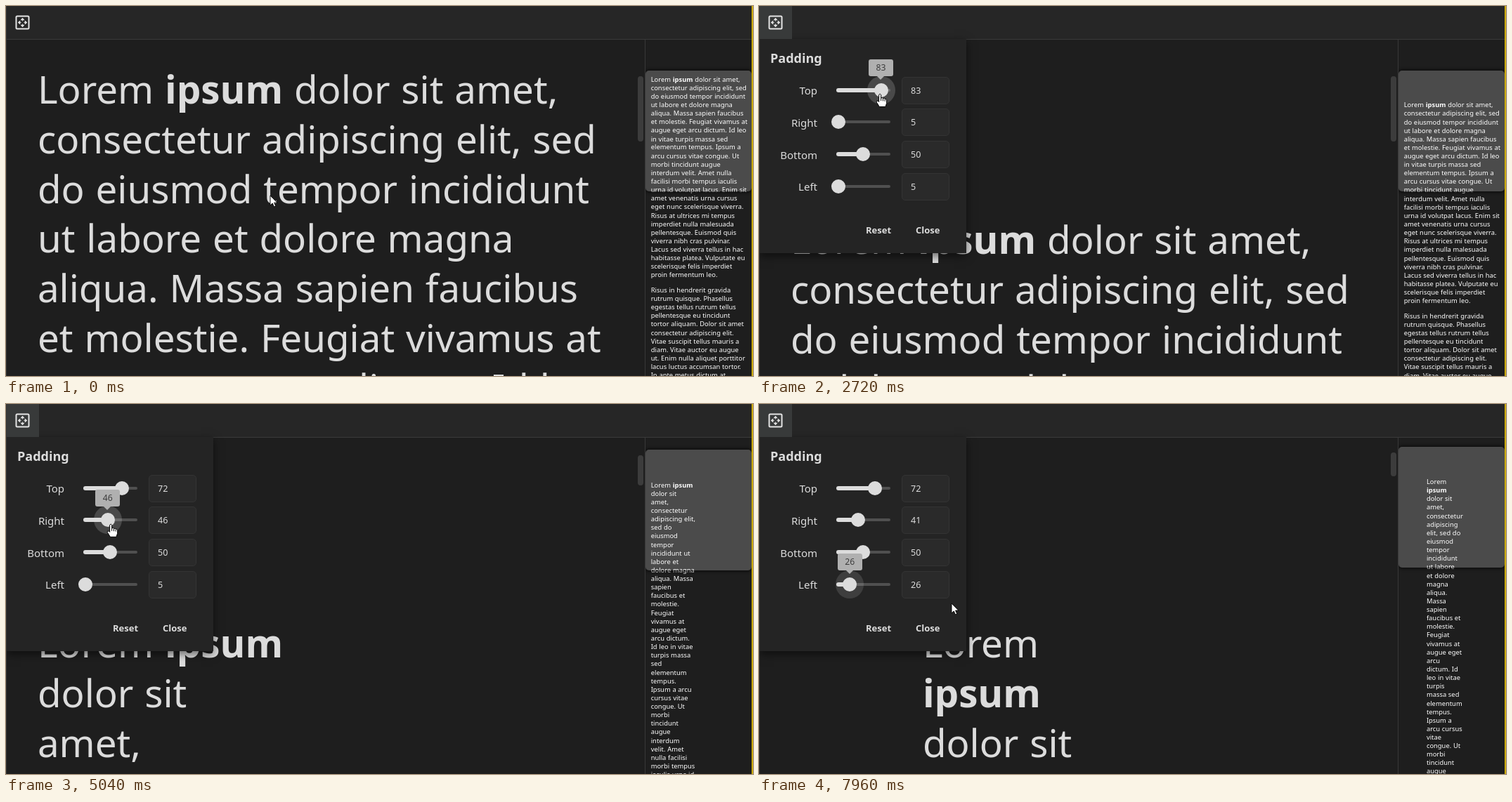
Write an HTML page that moves like this. It is 1063x527 px and loops after 8 s.

```html
<!DOCTYPE html>
<html lang="en">
<head>
<meta charset="utf-8">
<title>Padding editor</title>
<style>
html, body { margin: 0; width: 100%; height: 100%; overflow: hidden; background: #1e1e1e; }
.stage { position: relative; width: 1063px; height: 527px; overflow: hidden; font-family: "Noto Sans", "Open Sans", sans-serif; color: #dcdcdc; }
.stage div, .stage svg, .stage span { position: absolute; box-sizing: border-box; }
.topbar { inset: 0 0 auto 0; height: 48px; background: #262626; border-bottom: 1px solid #3a3a3a; }
.edge { left: 0; top: 0; width: 1px; height: 527px; background: #343434; }
.accent { right: 0; top: 0; width: 2px; height: 527px; background: #c9a80c; }

.main { left: 0; top: 48px; width: 909px; height: 479px; overflow: hidden; }
.map { left: 909px; top: 48px; width: 152px; height: 479px; overflow: hidden; border-left: 1px solid #383838; }
.mini { left: -.5px; transform-origin: 0 0; color: #fff; }
.text { font-size: 54.7px; line-height: 70.8px; word-spacing: .03em; }
.text p { margin: 0 0 55px; }
.lens { left: 0; width: 151px; height: 172px; border-radius: 5px; background: rgba(255,255,255,.2); box-shadow: 0 0 5px 1px rgba(0,0,0,.75); }
.scroll { left: 899px; width: 8px; border-radius: 4px; background: #3c3c3c; }

.button { left: 0; top: 0; width: 47px; height: 47px; background: #383a3a; }
.panel { left: 1px; top: 47px; width: 294px; height: 305px; background: #242424; box-shadow: 0 4px 12px rgba(0,0,0,.55); }
.title { left: 15px; top: 14px; font-size: 18px; line-height: 26px; font-weight: 600; }
.action { top: 262px; font-size: 13px; line-height: 20px; font-weight: 600; }
.row { left: 0; width: 294px; height: 0; }
.label { right: 212px; top: -10px; font-size: 15px; line-height: 20px; }
.track { left: 109px; top: -2.5px; width: 77px; height: 4px; border-radius: 2px; background: #505050; }
.fill { left: 109px; top: -3.5px; height: 6px; border-radius: 3px; background: #dcdcdc; }
.thumb { top: -10.5px; width: 20px; height: 20px; margin-left: -10px; border-radius: 50%; background: #dcdcdc; }
.halo { top: -20.5px; width: 40px; height: 40px; margin-left: -20px; border-radius: 50%; background: #dcdcdc; }
.input { left: 202px; top: -19.5px; width: 68px; height: 39px; padding-left: 12px; border: 1px solid #343434; border-radius: 5px; background: #2a2a2a; font-size: 12.6px; line-height: 37px; }
.bubble { top: -44px; width: 35px; height: 24px; margin-left: -17.5px; border-radius: 3px; background: #b0b0b0; color: #3c3c3c; font-size: 12.2px; line-height: 24px; text-align: center; }
.bubble::after { content: ""; position: absolute; left: 12px; top: 24px; border: 5.5px solid transparent; border-top-color: #b0b0b0; border-bottom: 0; }
.cursor { left: 0; top: 0; overflow: visible; }
</style>
</head>
<body>
<div class="stage">
  <div class="main"><div class="text"></div></div>
  <div class="map"><div class="mini"><div class="text"></div></div><div class="lens"></div></div>
  <div class="scroll"></div>
  <div class="topbar"></div>
  <div class="panel">
    <div class="title">Padding</div>
    <div class="action" style="left:151px">Reset</div>
    <div class="action" style="left:222px">Close</div>
  </div>
  <div class="button"></div>
  <svg width="47" height="47" fill="none" stroke="#e4e4e4">
    <rect x="14.5" y="14.5" width="18" height="18" rx="1.5" stroke-width="2"/>
    <g id="arrows"></g>
  </svg>
  <div class="edge"></div>
  <div class="accent"></div>
  <svg class="cursor" width="20" height="24" stroke="#000" fill="#fff" stroke-linejoin="round">
    <path id="arrow" transform="scale(.9)" d="M0 0V15.5L3.6 12.2L6 17.6L8.6 16.5L6.2 11.2H11Z"/>
    <path id="hand" d="M-1.5 1.5Q0 -1 1.5 1.5V6Q3.2 5 4.3 6.6Q6 5.8 7 7.4Q9.2 6.8 9.5 9V13.5L7.8 18.5H-.8L-5 11.8Q-5 9.2 -2.6 10.4L-1.5 11.6ZM1.5 6V10M4.3 7V10.4M7 8V10.8"/>
  </svg>
</div>
<script>
const $ = (selector, root = document) => root.querySelector(selector);
const paragraphs = [
  `Lorem <b>ipsum</b> dolor sit amet, consectetur adipiscing elit, sed do eiusmod tempor incididunt ut labore et dolore magna aliqua. Massa sapien faucibus et molestie. Feugiat vivamus at augue eget arcu dictum. Id leo in vitae turpis massa sed elementum tempus. Ipsum a arcu cursus vitae congue. Ut morbi tincidunt augue interdum velit. Amet nulla facilisi morbi tempus iaculis urna id volutpat lacus. Enim sit amet venenatis urna cursus eget nunc scelerisque viverra. Risus at ultrices mi tempus imperdiet nulla malesuada pellentesque. Euismod quis viverra nibh cras pulvinar. Lacus sed viverra tellus in hac habitasse platea. Vulputate eu scelerisque felis imperdiet proin fermentum leo.`,
  `Risus in hendrerit gravida rutrum quisque. Phasellus egestas tellus rutrum tellus pellentesque eu tincidunt tortor aliquam. Dolor sit amet consectetur adipiscing elit. Vitae suscipit tellus mauris a diam. Vitae auctor eu augue ut. Enim nulla aliquet porttitor lacus luctus accumsan tortor. In ante metus dictum at tempor commodo.`
];
const texts = [...document.querySelectorAll('.text')];
for (const text of texts) text.innerHTML = paragraphs.map(p => `<p>${p}</p>`).join('');

$('#arrows').innerHTML = [0, 90, 180, 270].map(angle =>
  `<path transform="rotate(${angle} 23.5 23.5)" d="M23.5 17.2l2.3 2.6h-4.6zM23.5 19.5v2" fill="#e4e4e4"/>`).join('');

const LOOP = 8000, STEP = 40;
const LAG = 180;            // the text follows the sliders this much later
const VIEW_TOP = 48, MAP_SCALE = .1713;

const mix = (a, b, k) => a + (b - a) * k;
const progress = (t, start, end) => Math.min(1, Math.max(0, (t - start) / (end - start)));
const pulse = (t, [start, end]) => progress(t, start, start + 120) * (1 - progress(t, end, end + 120));
const linear = k => k;
const easeOut = k => 1 - (1 - k) ** 3;
const easeInOut = k => k * k * (3 - 2 * k);

// strokes: start, end, value reached, easing
const sliders = {
  top: { label: 'Top', rest: 50, grip: -1, hover: [2040, 3880], drag: [2200, 3880],
    strokes: [[2200, 2920, 95, linear], [3120, 3320, 73, easeOut], [3480, 3600, 72, linear]] },
  right: { label: 'Right', rest: 5, grip: 4, hover: [4160, 5440], drag: [4200, 5440],
    strokes: [[4240, 4800, 53.8, linear], [4960, 5280, 41, easeOut]] },
  bottom: { label: 'Bottom', rest: 50, strokes: [] },
  left: { label: 'Left', rest: 5, grip: 7, hover: [5560, 7520], drag: [5560, LOOP],
    strokes: [[5745, 6160, 36, linear], [6520, 7140, 26, easeInOut]] }
};

const valueAt = (slider, t) => slider.strokes.reduce(
  (value, [start, end, to, ease]) => mix(value, to, ease(progress(t, start, end))), slider.rest);
const thumbX = value => 108.2 + .775 * value;

Object.values(sliders).forEach((slider, i) => {
  const row = document.createElement('div');
  row.className = 'row';
  slider.y = 73 + i * 45.8;
  row.style.top = slider.y + 'px';
  row.innerHTML = `<span class="label">${slider.label}</span><div class="track"></div>` +
    '<div class="fill"></div><div class="halo"></div><div class="thumb"></div>' +
    '<div class="input"></div><div class="bubble"></div>';
  $('.panel').append(row);
  slider.part = name => $('.' + name, row);
});

function drawSlider({ part, hover, drag, ...slider }, t) {
  const value = Math.round(valueAt(slider, t));
  const x = thumbX(value);
  const over = hover ? pulse(t, hover) : 0, held = drag ? pulse(t, drag) : 0;
  part('fill').style.width = x - 109 + 'px';
  for (const name of ['halo', 'thumb', 'bubble']) part(name).style.left = x + 'px';
  part('halo').style.transform = `scale(${.7 + .3 * held})`;
  part('halo').style.opacity = .06 * over + .14 * held;
  part('bubble').style.opacity = held;
  part('input').textContent = part('bubble').textContent = value;
}

function drawText(t) {
  const [top, right, left] = ['top', 'right', 'left'].map(side => valueAt(sliders[side], t - LAG));
  const width = 6 + 8.886 * (100 - left - right);
  const lens = .062 * width - 6;
  for (const text of texts) {
    text.style.left = 8.95 * left + .2 + 'px';
    text.style.top = 35 + 10.09 * (top - 50) + 'px';
    text.style.width = width + 'px';
  }
  $('.mini').style.transform = `translateY(${lens}px) scale(${MAP_SCALE})`;
  $('.lens').style.top = lens + 'px';
  $('.scroll').style.top = lens + VIEW_TOP + 8 + 'px';
  $('.scroll').style.height = .115 * width + 'px';
}

const point = (x, y) => () => [x, y];
const holding = slider => t => [thumbX(valueAt(slider, t)) + 1 + slider.grip, slider.y + 52];
const moves = [
  [0, 80, point(269, 241)], [280, 920, point(10, 30)], [1320, 1400, point(24, 34)],
  [1640, 2120, holding(sliders.top)], [3800, 4160, holding(sliders.right)],
  [5440, 5720, holding(sliders.left)], [7520, 7960, point(274, 284)]
];

function drawCursor(t) {
  let pos = [376, 270];
  for (const [start, end, target] of moves) {
    const k = easeInOut(progress(t, start, end)), goal = target(t);
    pos = pos.map((p, i) => mix(p, goal[i], k));
  }
  const isHand = (t >= 1320 && t < 1680) || (t >= 2040 && t < 7360);
  $('.cursor').style.transform = `translate(${pos[0]}px, ${pos[1]}px)`;
  $('#hand').style.display = isHand ? '' : 'none';
  $('#arrow').style.display = isHand ? 'none' : '';
}

function draw(t) {
  drawText(t);
  $('.button').style.opacity = progress(t, 1280, 1400);
  $('.panel').style.opacity = progress(t, 1480, 1680);
  for (const slider of Object.values(sliders)) drawSlider(slider, t);
  drawCursor(t);
}

function frame() {
  const t = performance.now() % LOOP;
  draw(Math.floor(t / STEP) * STEP);
  requestAnimationFrame(frame);
}
frame();
</script>
</body>
</html>
```
